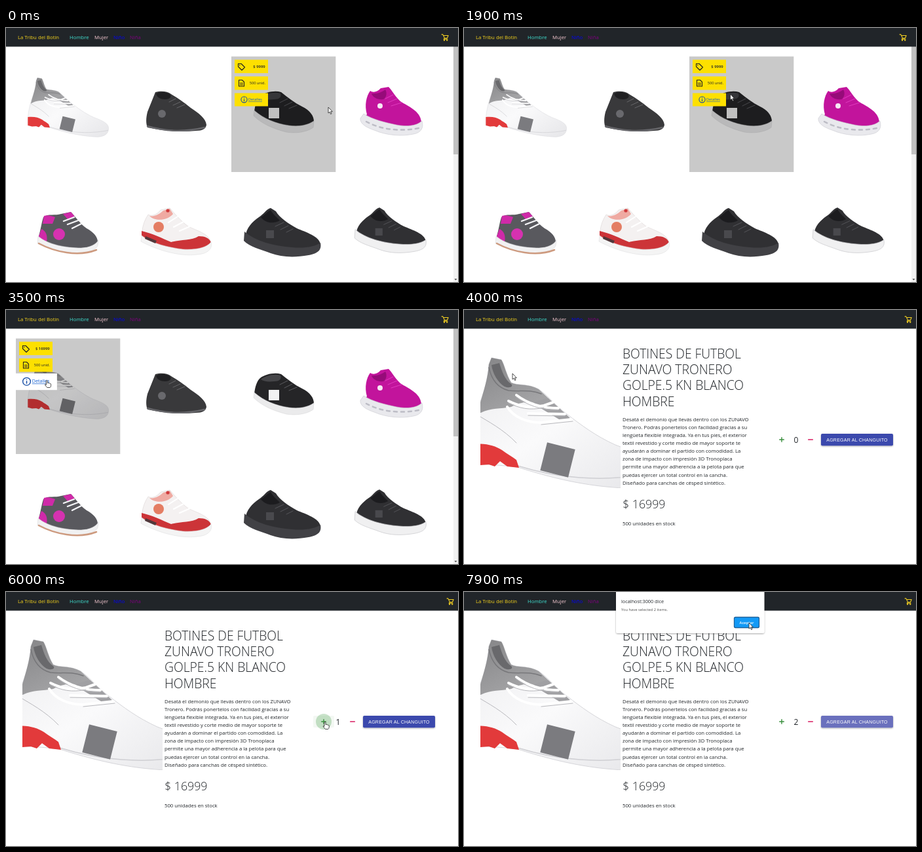
Animation, 690 px wide and 388 px high, one loop 8000 ms. Source, as an HTML page:

```html
<!DOCTYPE html>
<html lang="es">
<head>
<meta charset="utf-8">
<title>Tienda</title>
<style>
html, body { margin: 0; width: 100%; height: 100%; overflow: hidden; background: #fff; }
svg { display: block; width: 100%; height: 100%; font: 7.75px "Open Sans", "Noto Sans", sans-serif; fill: #212529; }
.line { fill: none; stroke-linecap: round; stroke-linejoin: round; }
</style>
</head>
<body>
<svg viewBox="0 0 690 388">
  <defs>
    <clipPath id="photo"><rect x="25" y="50" width="214" height="222"/></clipPath>
    <linearGradient id="upper" x2="1" y2="1">
      <stop stop-color="#ececee"/><stop offset=".5" stop-color="#fafafb"/><stop offset="1" stop-color="#e6e6e9"/>
    </linearGradient>
    <linearGradient id="knit" x2=".6" y2="1">
      <stop stop-color="#858587"/><stop offset="1" stop-color="#a6a6a8"/>
    </linearGradient>
    <filter id="soft" x="-20%" y="-20%" width="140%" height="160%">
      <feDropShadow dx="0" dy="1" stdDeviation="1" flood-opacity=".35"/>
    </filter>
    <g id="boot">
      <path fill="url(#upper)" stroke="#d6d6da" d="M38 83L42 73L57 76C62 84 64 98 72 111C82 116 98 112 114 121C130 132 140 147 157 159C178 175 200 192 231 206C258 216 282 226 281 243C281 262 268 270 245 272C200 270 150 262 82 240C50 236 25 236 10 234C8 205 14 170 25 140C33 118 37 100 38 83Z"/>
      <path fill="url(#knit)" d="M38 83L42 73L57 76C62 84 64 98 72 111C82 116 98 112 114 121L128 134L112 143C96 138 84 142 72 148C54 152 40 148 20 160C24 140 36 112 38 83Z"/>
      <path fill="#69696c" d="M42 84L54 81C58 94 62 106 72 113C76 117 70 120 62 117C52 111 44 98 42 84Z"/>
      <path class="line" stroke="#77777a" stroke-width="1.5" d="M38 88C42 106 52 119 68 123C86 125 100 121 118 128"/>
      <path fill="#a0a0a3" d="M104 142L128 134L162 165L150 170Z"/>
      <path class="line" stroke="#fff" stroke-width="4" d="M68 139C84 147 100 151 122 146L136 141M80 130C96 142 116 150 144 150M98 158L154 159M118 172L164 167M66 148C76 164 96 172 118 172"/>
      <path class="line" stroke="#b9b9bd" stroke-width="1" d="M68 142C84 150 100 154 122 149M80 133C96 145 116 153 144 153M98 161L154 162M118 175L166 170M20 160C36 170 60 182 80 203"/>
      <path class="line" stroke="#cfcfd3" stroke-width="1.5" d="M82 238C140 256 210 264 279 250"/>
      <path fill="#e23a3b" d="M10 205C30 203 46 206 58 214C66 220 74 224 80 229L84 241L66 239L55 231L47 239L38 236L24 237L10 233Z"/>
      <rect x="-22" y="-22" width="44" height="44" fill="#7b7b7f" transform="translate(143 229) rotate(14)"/>
    </g>
    <g id="runner">
      <path fill="#303033" d="M366 318C366 306 376 296 386 289C394 284 398 276 404 275L412 280C418 290 430 298 444 306C458 312 478 318 480 330C470 336 455 337 436 336C410 334 384 328 366 318Z"/>
      <path fill="#1c1c1f" d="M389 289C396 285 399 280 404 278C407 284 413 289 418 294C409 299 397 299 389 289Z"/>
      <path class="line" stroke="#55555a" d="M411 303L424 297M419 308L431 302M428 312L438 307"/>
      <rect x="397" y="309" width="12" height="12" fill="#49494d"/>
    </g>
    <path id="sole" d="M364 311C381 326 410 333 436 335C456 337 472 334 480 328C482 338 478 344 462 347C440 351 420 350 404 344C388 338 372 334 363 325Z"/>
    <g id="cart" class="line" stroke="#f2cf22" stroke-width="1.2">
      <path d="M-5-5H-3L0 1.4H4.6L6.4-3.2H-2M0 1.4L-1.5 3.2H5"/>
      <circle cx="-.5" cy="5" r=".7"/><circle cx="4.3" cy="5" r=".7"/>
    </g>
  </defs>

  <g id="shop">
    <use href="#boot" transform="translate(28.8 42.8) scale(.4545)"/>
    <g>
      <path fill="#39393b" d="M216 128C220 118 224 108 228 98C236 96 246 96 252 101C262 107 270 112 282 122C294 130 305 138 306 148C305 154 300 157 290 157C268 159 244 158 216 152C213 145 214 136 216 128Z"/>
      <path fill="#202022" d="M229 100C236 97 246 97 251 102C253 106 249 109 243 109C236 109 230 106 229 100Z"/>
      <path class="line" stroke="#67676a" d="M249 113L259 108M255 118L266 113M261 122L273 117"/>
      <path class="line" stroke="#66666a" stroke-width="2.4" d="M216 150C240 157 270 160 303 152"/>
      <circle cx="238" cy="131" r="6" fill="#69696d"/>
    </g>
    <g>
      <path fill="#252527" d="M379 128C380 118 383 108 388 104C396 98 410 95 420 98C430 106 440 114 452 120C464 126 470 134 470 143C460 150 445 151 432 150C412 146 394 140 379 128Z"/>
      <path fill="#454548" d="M389 106C397 100 410 97 419 100C421 106 417 109 409 109C400 110 393 109 389 106Z"/>
      <path class="line" stroke="#5c5c60" d="M418 114L430 108M425 119L437 113M432 123L444 118"/>
      <path fill="#ebebec" stroke="#d3d3d5" stroke-width=".5" d="M379 126C394 139 412 146 432 149C446 151 460 149 470 142L469 152C458 160 440 161 428 159C408 154 390 146 378 134Z"/>
      <rect x="401" y="122" width="16" height="16" fill="#f3f3f3"/>
    </g>
    <g>
      <path fill="#c2149c" d="M551 132C547 118 550 104 556 96C560 99 567 98 572 92L584 90C590 96 592 102 602 112C614 120 632 126 634 143C626 151 610 151 596 149C578 145 560 142 549 134Z"/>
      <path fill="#960b79" d="M558 100C566 101 574 98 579 94C582 99 581 106 576 109C567 110 560 106 558 100Z"/>
      <path class="line" stroke="#e13cc0" d="M579 108L591 102M583 114L597 108M588 119L604 114"/>
      <path fill="#e9e9ed" stroke="#c9c9d0" stroke-width=".6" d="M546 131C560 140 578 144 596 148C612 151 626 150 635 142C638 152 634 160 622 162C604 166 580 164 562 156C550 152 540 146 541 138Z"/>
      <path class="line" stroke="#bdbdc6" stroke-width="2.5" stroke-dasharray="5 6" d="M550 143C570 154 598 159 630 153"/>
      <circle cx="571" cy="119" r="4" fill="#f7e8f4"/>
    </g>
    <g>
      <path fill="#59595e" d="M50 318C53 308 54 298 57 289C64 283 76 287 84 284L99 281C106 288 113 299 123 306C134 312 140 319 140 327C132 337 112 337 94 335C76 333 60 330 50 324Z"/>
      <path fill="#cf2aa8" d="M56 299L58 287C64 285 70 287 75 289L71 299ZM50 318L54 307C61 310 64 317 62 327L50 324ZM87 284L99 281L105 288L94 292Z"/>
      <path class="line" stroke="#f4f4f6" stroke-width="2.4" d="M88 295L104 289M94 300L110 294M101 306L115 299"/>
      <path fill="#f1f1f2" stroke="#d6d6d8" stroke-width=".5" d="M49 318C64 331 92 336 114 336C128 336 138 330 141 324L140 333C134 342 119 344 104 344C82 342 60 336 48 329Z"/>
      <path class="line" stroke="#cd9a7f" stroke-width="2.5" d="M50 329C74 342 110 350 138 339"/>
      <circle cx="81" cy="315" r="9" fill="#d632b0"/>
    </g>
    <g>
      <path fill="#f4f1f1" stroke="#dcd6d6" stroke-width=".6" d="M208 316C207 306 211 294 217 285C222 288 230 286 236 278L250 275C258 284 266 294 278 303C292 310 310 314 313 328C308 340 290 342 270 341C244 338 222 330 208 316Z"/>
      <path fill="#cc3438" d="M207 310C224 314 238 321 252 327C266 323 283 325 294 318C304 318 311 321 313 328C305 339 286 340 268 339C244 336 222 329 207 318Z"/>
      <path fill="#efaaa2" d="M219 287C227 289 236 283 240 279L250 276L255 284C248 293 229 297 219 287Z"/>
      <path class="line" stroke="#fff" stroke-width="2" d="M248 297L262 288M256 304L271 296M265 310L281 303"/>
      <path fill="#f4f4f4" stroke="#d8d8da" stroke-width=".5" d="M207 317C224 330 248 335 270 338C290 339 306 336 313 327C316 337 308 345 292 346C264 350 228 338 206 326Z"/>
      <path fill="#51383b" d="M213 318L230 325L228 329L212 322Z"/>
      <circle cx="233" cy="304" r="8" fill="#e47d63"/>
      <circle cx="247" cy="279" r="2.6" fill="#cf3a3c"/>
    </g>
    <use href="#runner"/><use href="#sole" fill="#414145"/>
    <g transform="translate(194.5 18.5) scale(.93)">
      <use href="#runner"/><use href="#sole" fill="#f0f0f1" stroke="#c4c4c8" stroke-width=".7"/>
    </g>
    <g id="cards"></g>
    <path fill="#f1f1f1" d="M683 0h7v388h-7z"/>
    <path fill="#c1c1c1" d="M683 8h7v185h-7z"/>
    <path fill="#555" d="M684.5 5l2-2.5 2 2.5zM684.5 383l2 2.5 2-2.5z"/>
  </g>

  <g id="detail">
    <g clip-path="url(#photo)"><use href="#boot"/></g>
    <g id="title" font-size="19.3" font-weight="300"></g>
    <g id="info"></g>
    <text x="242" y="303" font-size="17.8" font-weight="300">$ 16999</text>
    <text x="242" y="329.3">500 unidades en stock</text>
    <rect id="plusHover" x="469" y="189" width="32" height="18" rx="2" fill="#f3f8f3"/>
    <circle id="ripple" cx="485" cy="198" fill="#3c963f"/>
    <path class="line" stroke="#388e3c" stroke-width="1.4" d="M481.7 198h6.6M485 194.7v6.6"/>
    <path class="line" stroke="#d81b60" stroke-width="1.5" d="M525.7 198h6.6"/>
    <text id="count" x="507" y="203" font-size="12" text-anchor="middle"></text>
    <rect id="add" x="545" y="189" width="110" height="18.3" rx="2" filter="url(#soft)"/>
    <text x="600" y="200.7" fill="#fff" text-anchor="middle" font-size="7.07" letter-spacing=".2" font-family="Liberation Sans, Arial, sans-serif">AGREGAR AL CHANGUITO</text>
  </g>

  <path fill="#212529" d="M0 0h690v28.5H0z"/>
  <text x="18" y="17.2" fill="#f7d51d">La Tribu del Botín</text>
  <text x="97" y="17.2" fill="#40e0d0" font-weight="500">Hombre</text>
  <text x="135" y="17.2" fill="#f8ccd4">Mujer</text>
  <text x="164" y="17.2" fill="#00f" font-weight="500">Niño</text>
  <text x="189" y="17.2" fill="#800080" font-weight="500">Niña</text>
  <use id="navCart" href="#cart"/>

  <g id="alert">
    <path fill="#fff" filter="url(#soft)" d="M232-4H458.5V60q0 3-3 3H235q-3 0-3-3z"/>
    <text x="240" y="17" font-size="7.3" font-weight="500">localhost:3000 dice</text>
    <text x="240" y="29" font-size="5.8" fill="#555">You have selected 2 items.</text>
    <rect x="412.5" y="38.5" width="38" height="16" rx="2" fill="#139af6" stroke="#20639c" stroke-width="1.3"/>
    <text x="431.5" y="48.6" font-size="5.8" font-weight="600" fill="#fff" text-anchor="middle">Aceptar</text>
  </g>

  <g id="cursor" stroke="#222" stroke-width=".8" fill="#fff">
    <path id="arrow" d="M0 0V9L2.1 7.2L3.6 10.5L5 9.9L3.6 6.7H6.3Z"/>
    <path id="hand" stroke-linejoin="round" d="M-1 1q1-1.5 2 0V4.5Q2.6 3.8 3 5Q4.5 4.2 4.9 5.5Q6.2 5.2 6.2 6.5V8.5Q6 10.8 4.8 11.5H.5Q-1.5 9.5-3 7Q-2.6 5.9-1 7.3Z"/>
  </g>
</svg>
<script>
const $ = id => document.getElementById(id);
const show = (id, on) => $(id).style.display = on ? '' : 'none';
const ramp = (t, from, to) => Math.max(0, Math.min(1, (t - from) / (to - from)));

const lines = (id, y, step, list) => $(id).innerHTML =
  list.map((s, i) => `<text x="242" y="${y + i * step}">${s}</text>`).join('');

lines('title', 73.8, 24.25, ['BOTINES DE FUTBOL', 'ZUNAVO TRONERO', 'GOLPE.5 KN BLANCO', 'HOMBRE']);
lines('info', 169.7, 12.12, [
  'Desatá el demonio que llevás dentro con los ZUNAVO',
  'Tronero. Podrás ponertelos con facilidad gracias a su',
  'lengüeta flexible integrada. Ya en tus pies, el exterior',
  'textil revestido y corte medio de mayor soporte te',
  'ayudarán a dominar el partido con comodidad. La',
  'zona de impacto con impresión 3D Tronoplaca',
  'permite una mayor adherencia a la pelota para que',
  'puedas ejercer un total control en la cancha.',
  'Diseñado para canchas de césped sintético.'
]);

const card = (i, price) => `
  <g id="card${i}" transform="translate(${15 + 164.5 * i} 0)" font-size="5.6">
    <rect y="43.5" width="159.3" height="176.5" fill-opacity=".21" fill="#000"/>
    <path fill="#fde000" d="M5 48.5h51v20.5H5zM5 74h51v20.5H5z"/>
    <path class="line" stroke="#222" stroke-width="1.1" d="M10.5 54.5h4.5l5.5 5.5-4.5 4.5-5.5-5.5z"/>
    <circle cx="12.7" cy="56.7" r=".8"/>
    <path class="line" stroke="#222" stroke-width="1.1" d="M11.5 79.5h5l3 3v6.5h-8zM13.5 84.3h4M13.5 86.7h4"/>
    <text x="51.7" y="61.2" font-size="5.9" font-weight="600" text-anchor="end">$ ${price}</text>
    <text x="52" y="86.2" text-anchor="end">500 unid.</text>
    <g class="link">
      <rect x="5" y="99.5" width="51" height="20" fill="#fde000"/>
      <circle class="line" cx="19.5" cy="109.3" r="4.6" stroke="#174ea6" stroke-width="1.1"/>
      <path class="line" stroke="#174ea6" stroke-width="1.2" d="M19.5 109v2.5M19.5 106.9v.1"/>
      <text x="26" y="111" fill="#0d5bd1" text-decoration="underline">Detalles</text>
    </g>
  </g>`;
$('cards').innerHTML = card(0, 16999) + card(1, 12999) + card(2, 9999);
const link = document.querySelector('#card0 .link');

// Pointer stops: time, x, y
const path = [
  [0, 492, 121], [1500, 492, 121], [1600, 495, 126], [1800, 478, 112], [2000, 335, 90],
  [2300, 185, 72], [2500, 100, 67], [2600, 88, 70], [2800, 83, 83], [3200, 63, 107],
  [3700, 62, 107], [4000, 74, 97], [4400, 230, 150], [4800, 425, 204], [5000, 448, 203],
  [5400, 487, 198], [6500, 487, 198], [6900, 592, 197], [7300, 592, 197], [7900, 435, 47], [8000, 435, 47]
];

function pointer(t) {
  const n = path.findIndex(p => t < p[0]);
  const [a, x, y] = path[n - 1], [b, u, v] = path[n];
  const k = ramp(t, a, b);
  return `translate(${x + (u - x) * k} ${y + (v - y) * k})`;
}

function draw(t) {
  const shop = t < 3700;
  show('shop', shop);
  show('detail', !shop);
  $('navCart').setAttribute('transform', `translate(${shop ? 669.5 : 677.5} 14.3) scale(.88)`);

  $('card0').style.opacity = ramp(t, 2450, 2950);
  $('card1').style.opacity = .4 * ramp(t, 2000, 2200) * (1 - ramp(t, 2200, 2400));
  $('card2').style.opacity = 1 - ramp(t, 1950, 2300);
  const grow = ramp(t, 3100, 3400);
  link.setAttribute('transform', `translate(30.5 109.5) scale(${1 + .27 * grow}) translate(-30.5 -109.5)`);
  link.firstElementChild.setAttribute('fill', `rgb(${253 + 2 * grow},${224 + 31 * grow},${255 * grow})`);

  $('count').textContent = t < 5800 ? 0 : t < 6300 ? 1 : 2;
  show('plusHover', t >= 5600 && t < 6600);
  $('ripple').setAttribute('r', 12 * ramp(t, 5600, 5900));
  $('ripple').setAttribute('opacity', .27 * (1 - ramp(t, 6400, 6800)));
  $('add').setAttribute('fill', t < 6800 ? '#3a49ad' : t < 7000 ? '#303f9f' : '#6a70bd');
  show('alert', t >= 7200);

  const hand = t >= 3200 && shop || t >= 5300 && t < 6600 || t >= 6800 && t < 7200;
  show('hand', hand);
  show('arrow', !hand);
  $('cursor').setAttribute('transform', pointer(t));
}

const begin = performance.now();
function tick() {
  // The screen refreshes ten times a second.
  draw(Math.floor((performance.now() - begin) % 8000 / 100) * 100);
  requestAnimationFrame(tick);
}
tick();
</script>
</body>
</html>
```
